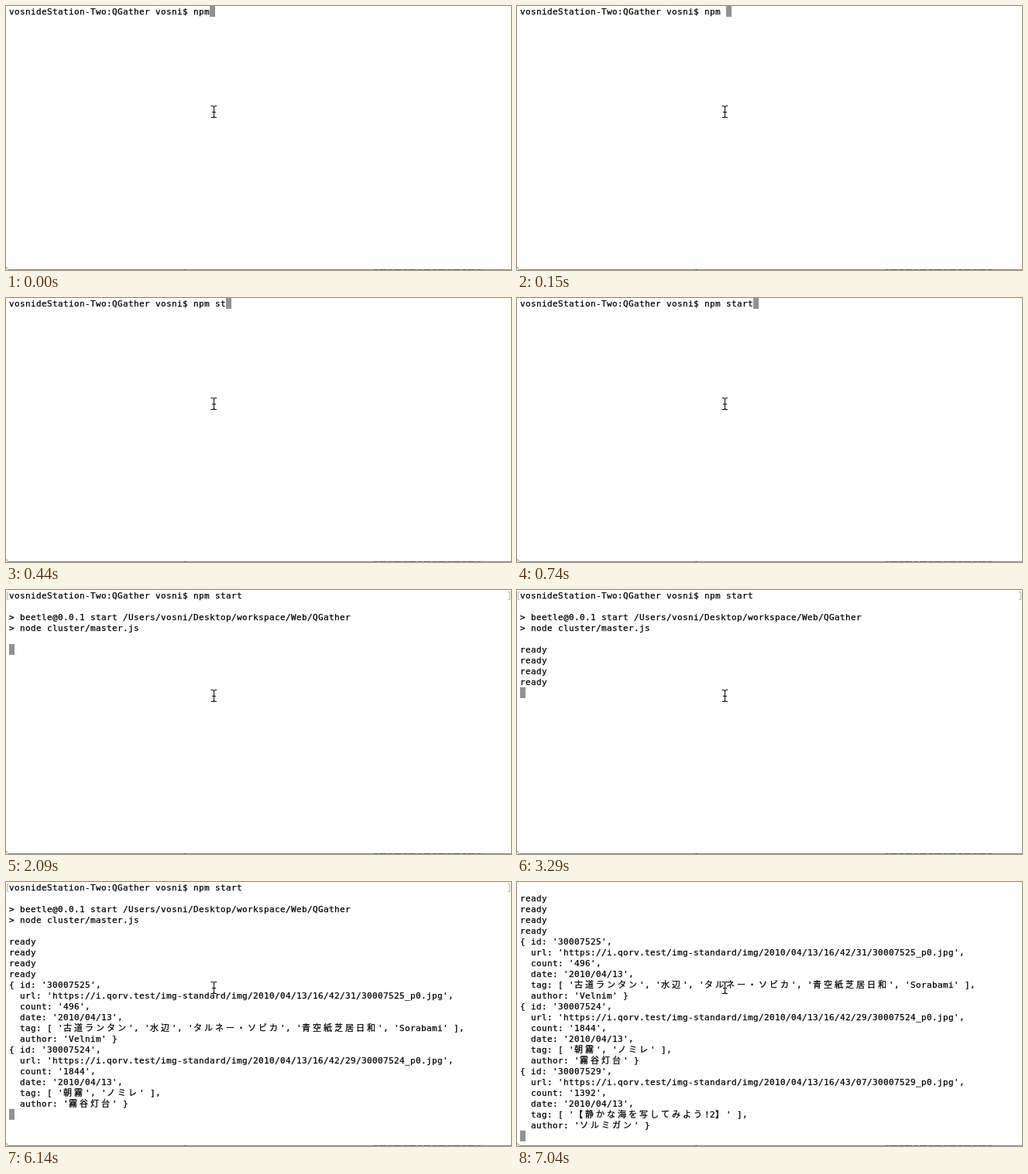
Animation of 652x342 px, one loop 8 s. Source, as an HTML page:

```html
<!DOCTYPE html>
<html lang="ja">
<head>
<meta charset="utf-8">
<title>Terminal</title>
<style>
  html, body { margin: 0; width: 100%; height: 100%; overflow: hidden; background: #fefefe; }
  #stage { position: relative; width: 652px; height: 342px; overflow: hidden; background: #fefefe; }
  #screen {
    position: absolute; left: 0; top: 0; width: 652px; height: 336px; overflow: hidden;
    color: #000; font: 11px/15px "DejaVu Sans Mono", monospace; -webkit-text-stroke: 0.25px #000;
    letter-spacing: calc(7px - 1ch); font-kerning: none; font-variant-ligatures: none;
  }
  .row { position: absolute; left: 4px; height: 14px; white-space: pre; }
  .wide {
    font-family: "Noto Sans CJK JP", "Noto Sans CJK", sans-serif;
    line-height: 0; letter-spacing: 3px; text-spacing-trim: space-all;
  }
  #caret { position: absolute; width: 7px; height: 14px; background: #929292; }
  svg { position: absolute; left: 0; top: 0; fill: none; }
</style>
</head>
<body>
<div id="stage">
  <div id="screen"></div>
  <svg width="652" height="342" viewBox="0 0 652 342">
    <defs>
      <path id="beam" d="M264.5 129.5H266.5Q268.5 129.5 268.5 131.5Q268.5 129.5 270.5 129.5H272M268.5 131V143.5M264.5 144.5H266.5Q268.5 144.5 268.5 142.5Q268.5 144.5 270.5 144.5H272M266 137.5H271"/>
    </defs>
    <path id="marks" d="M3.5 2.5H1.5V12.5H3.5M648 2.5H650.5V12.5H648" stroke="#b4b4b4"/>
    <path d="M0.5 338Q0.5 341.5 4 341.5H652" stroke="#8c8c8c"/>
    <path d="M230 341.5h3M475 341.5H616" stroke="#5c5c5c" stroke-dasharray="5 2 9 3"/>
    <use href="#beam" stroke="#fff" stroke-width="2.4"/>
    <use href="#beam" stroke="#111" stroke-width="1.1"/>
  </svg>
</div>
<script>
const LOOP = 8000, LINE = 14, CELL = 7, LEFT = 4, ROWS = 24;
const prompt = 'vosnideStation-Two:QGather vosni$ ';

const record = (id, time, count, tags, author) => [
  `{ id: '${id}',`,
  `  url: 'https://i.qorv.test/img-standard/img/2010/04/13/${time}/${id}_p0.jpg',`,
  `  count: '${count}',`,
  `  date: '2010/04/13',`,
  `  tag: [ ${tags.map(tag => `'${tag}'`).join(', ')} ],`,
  `  author: '${author}' }`
];

const lines = [
  prompt + 'npm start',
  '',
  '> beetle@0.0.1 start /Users/vosni/Desktop/workspace/Web/QGather',
  '> node cluster/master.js',
  '',
  ...Array(4).fill('ready'),
  ...record('30007525', '16/42/31', 496,
    ['古道ランタン', '水辺', 'タルネー・ソビカ', '青空紙芝居日和', 'Sorabami'], 'Velnim'),
  ...record('30007524', '16/42/29', 1844, ['朝霧', 'ノミレ'], '霧谷灯台'),
  ...record('30007529', '16/43/07', 1392, ['【静かな海を写してみよう!2】'], 'ソルミガン')
];

// [start ms, typed command or number of finished lines]
const steps = [
  [0, 'npm'], [150, 'npm '], [300, 'npm s'], [440, 'npm st'],
  [590, 'npm star'], [740, 'npm start'],
  [1490, 1], [2090, 5], [3290, 9], [6140, 21], [7040, 27]
];

const screen = document.getElementById('screen');
const marks = document.getElementById('marks');

const markup = text => text
  .replace(/&/g, '&amp;').replace(/</g, '&lt;').replace(/>/g, '&gt;')
  .replace(/[^\x00-\xff]+/g, run => `<span class="wide">${run}</span>`);

function show(state) {
  const typing = typeof state === 'string';
  const rows = typing ? [prompt + state] : lines.slice(0, state);
  const caretRow = typing ? 0 : rows.length;
  const caretCol = typing ? rows[0].length : 0;
  const scroll = Math.max(0, caretRow + 1 - ROWS);
  screen.innerHTML = rows.slice(scroll)
    .map((text, i) => `<div class="row" style="top:${i * LINE}px">${markup(text)}</div>`)
    .join('') +
    `<div id="caret" style="left:${LEFT + caretCol * CELL}px;top:${(caretRow - scroll) * LINE}px"></div>`;
  marks.style.display = typing || scroll ? 'none' : '';
}

const begin = performance.now();
let current = null;

function tick() {
  const t = (performance.now() - begin) % LOOP;
  const step = steps.filter(([start]) => start <= t).pop();
  if (step !== current) {
    current = step;
    show(step[1]);
  }
  requestAnimationFrame(tick);
}
tick();
</script>
</body>
</html>
```
